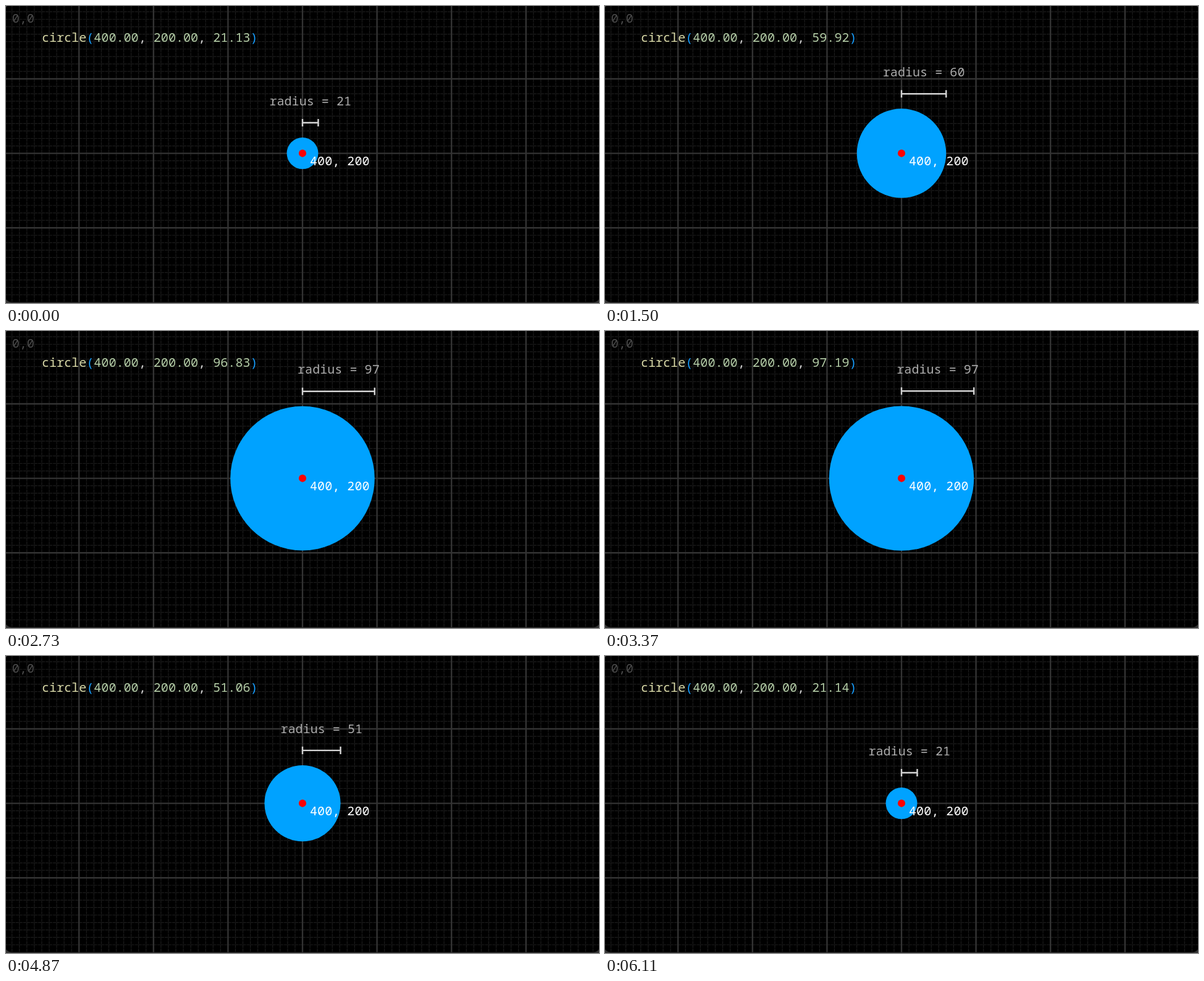
An HTML page for the animation above (6150 ms loop, 960x481 px).

```html
<!DOCTYPE html>
<html lang="en">
<head>
<meta charset="utf-8">
<title>Circle radius</title>
<style>
  html, body { margin: 0; width: 100%; height: 100%; overflow: hidden; background: #333; }
  svg { display: block; width: 960px; height: 481px; }
  text { font: 16.67px "Noto Sans Mono", "DejaVu Sans Mono", monospace; white-space: pre; }
  path { fill: none; }
  .minor { stroke: #1c1c1c; stroke-width: 1; stroke-dasharray: 4.2 .8; }
  .major { stroke: #333; stroke-width: 2; }
  .number { fill: #b5cea8; }
  .bracket { fill: #179fff; }
</style>
</head>
<body>
<svg viewBox="0 0 960 481">
  <g transform="translate(-2.4 -2.6) scale(1.206)">
    <rect width="800" height="400" rx="10" fill="#000"/>
    <path id="minor" class="minor"/>
    <path id="major" class="major"/>
    <text x="10" y="24.5" fill="#4b4b4b">0,0</text>
    <text x="50" y="50" fill="#d4d4d4"><tspan fill="#dcdcaa">circle</tspan><tspan class="bracket">(</tspan><tspan class="number">400.00</tspan>, <tspan class="number">200.00</tspan>, <tspan id="value" class="number"></tspan><tspan class="bracket">)</tspan></text>
    <circle id="disc" cx="400" cy="200" fill="#00a2ff"/>
    <path id="ruler" stroke="#d4d4d4" stroke-width="2"/>
    <text id="label" fill="#aaa" text-anchor="middle"></text>
    <circle cx="400" cy="200" r="5" fill="#f00"/>
    <text x="410" y="216.5" fill="#fff">400, 200</text>
  </g>
</svg>
<script>
const LOOP = 6150, LAST_STEP = 183;
const MIDDLE = 60, SWING = 39;
const $ = id => document.getElementById(id);

function gridPath(step, skip) {
  let d = "";
  for (let p = step; p < 800; p += step) {
    if (p % skip === 0) continue;
    d += `M${p} 0V400`;
    if (p < 400) d += `M0 ${p}H800`;
  }
  return d;
}
$("minor").setAttribute("d", gridPath(10, 100));
$("major").setAttribute("d", gridPath(100, Infinity));

// Radius readings [ms, radius], turned into phases of one slow cosine.
const phases = [
  [0, 21.13], [870, 36.83], [2070, 81.1], [2730, 96.83],
  [3930, 85.23], [4870, 51.06], [6100, 21.14]
].map(([ms, radius]) => {
  const angle = Math.acos((MIDDLE - radius) / SWING);
  return [ms, ms < 3000 ? angle : 2 * Math.PI - angle];
});

function radiusAt(ms) {
  let i = 1;
  while (i < phases.length - 1 && ms > phases[i][0]) i++;
  const [t0, a0] = phases[i - 1], [t1, a1] = phases[i];
  return MIDDLE - SWING * Math.cos(a0 + (a1 - a0) * (ms - t0) / (t1 - t0));
}

// Thirty steps a second, each starting on a whole 10 ms.
function stepStart(ms) {
  const snapped = Math.floor(ms / 10) * 10;
  const step = Math.min(LAST_STEP, Math.floor(snapped * 0.03 + 0.11));
  return Math.round(step / 0.3) * 10;
}

function draw(ms) {
  const r = radiusAt(stepStart(ms % LOOP));
  const top = 200 - r, right = 400 + r;
  $("value").textContent = r.toFixed(2);
  $("disc").setAttribute("r", r);
  $("ruler").setAttribute("d",
    `M400 ${top - 20}H${right}M400 ${top - 25}v10M${right} ${top - 25}v10`);
  $("label").setAttribute("x", 400 + r / 2);
  $("label").setAttribute("y", top - 43.5);
  $("label").textContent = `radius = ${Math.round(r)}`;
}

const start = performance.now();
function tick() {
  draw(performance.now() - start);
  requestAnimationFrame(tick);
}
tick();
</script>
</body>
</html>
```
